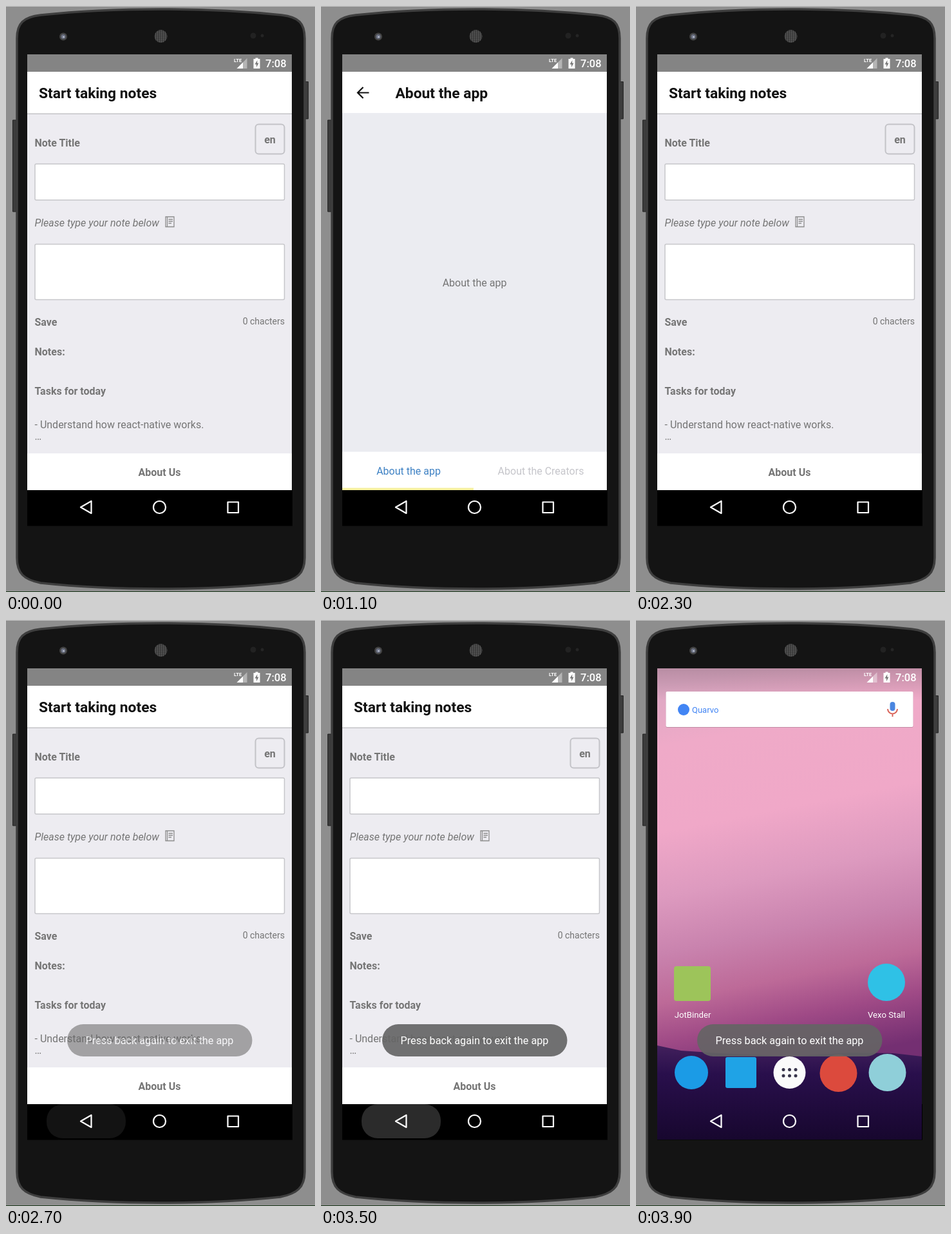
An HTML page that plays this animation: 480x909 px, repeating every 4000 ms.

```html
<!DOCTYPE html>
<html lang="en">
<head>
<meta charset="utf-8">
<title>Note app on a phone</title>
<style>
  html, body { margin: 0; width: 480px; height: 909px; overflow: hidden; background: #8e8e8e; }
  svg { display: block; }
  text { font: 16px Roboto, sans-serif; fill: #757575; }
  .b { font-weight: 700; }
  .i { font-style: italic; }
  .c { text-anchor: middle; }
  .title { font-size: 22.8px; font-weight: 700; fill: #111; }
  .label { font-size: 13.2px; fill: #fff; text-anchor: middle; }
  .field { fill: #fff; stroke: #c6c6ca; stroke-width: 1.5; }
</style>
</head>
<body>
<svg width="480" height="909" viewBox="0 0 480 909">
  <defs>
    <clipPath id="screen"><path d="M33 75H444V806H33z"/></clipPath>
    <linearGradient id="sky" gradientUnits="userSpaceOnUse" x1="180" y1="75" x2="300" y2="680">
      <stop offset="0" stop-color="#dca8c3"/>
      <stop offset=".15" stop-color="#efaac8"/>
      <stop offset=".36" stop-color="#f0a8c8"/>
      <stop offset=".52" stop-color="#dd9abf"/>
      <stop offset=".66" stop-color="#c983ae"/>
      <stop offset=".78" stop-color="#bd6a98"/>
      <stop offset=".88" stop-color="#9f4a86"/>
      <stop offset="1" stop-color="#742f72"/>
    </linearGradient>
    <linearGradient id="hills" x2="0" y2="1">
      <stop offset="0" stop-color="#42205c"/>
      <stop offset=".3" stop-color="#290f4c"/>
      <stop offset="1" stop-color="#17072e"/>
    </linearGradient>
    <linearGradient id="scrim" x2="0" y2="1">
      <stop offset="0" stop-opacity=".16"/>
      <stop offset="1" stop-opacity="0"/>
    </linearGradient>
    <pattern id="mesh" width="3" height="3" patternUnits="userSpaceOnUse">
      <path fill="#333" d="M0 0H3V3H0z"/>
      <circle cx="1.5" cy="1.5" r="1" fill="#686868"/>
    </pattern>
  </defs>

  <!-- Phone body -->
  <path fill="#c4c4c4" d="M0 0H480V1H0z"/>
  <path fill="#1d3a1d" d="M0 908H480V909H0z"/>
  <path fill="#3c3c3c" stroke="#222" d="M10.500 177H16V319H10.500zM464 117.500H469.500V175H464z"/>
  <path fill="#141414" stroke="#3e3e3e" stroke-width="3.500"
    d="M17 50C17 27 27 17 54 14Q140 5 240 5T428 14C455 17 464 27 464 50V856C464 880 452 890 426 895Q340 904 240 904T54 895C28 890 17 880 17 856z"/>
  <circle cx="89" cy="47.500" r="6" fill="#444"/>
  <circle cx="89" cy="47.500" r="3.500" fill="#6c7284"/>
  <circle cx="89.500" cy="48" r="1.300" fill="#c4c8d6"/>
  <circle cx="240.500" cy="47" r="10" fill="url(#mesh)"/>
  <circle cx="384" cy="46" r="4.500" fill="#222"/>
  <circle cx="398" cy="46" r="2.500" fill="#252525"/>
  <path d="M33 751H445V806.500H33z"/>

  <g clip-path="url(#screen)">
    <!-- Home screen -->
    <path fill="url(#sky)" d="M33 75H445V807H33z"/>
    <path fill="url(#hills)" d="M33 660L70 668 130 672 240 677 330 671 400 672 445 677V807H33z"/>
    <path fill="url(#scrim)" d="M33 75H445V125H33z"/>
    <rect x="46.500" y="112" width="384" height="55" rx="2" opacity=".18"/>
    <rect x="46.500" y="111" width="384" height="55" rx="2" fill="#fff"/>
    <circle cx="74" cy="139" r="9" fill="#4285f4"/>
    <text x="87" y="144" style="font-size:13px;fill:#4285f4">Quarvo</text>
    <rect x="394.500" y="127" width="8" height="14" rx="4" fill="#4a86e0"/>
    <path d="M391 138a7.500 7.500 0 0 0 15 0M398.500 146V150" fill="none" stroke="#d9645a" stroke-width="2"/>
    <rect x="59" y="537" width="57" height="54" rx="4" fill="#9dc45a"/>
    <circle cx="389" cy="562" r="29" fill="#2fc1e6"/>
    <text class="label" x="88" y="617">JotBinder</text>
    <text class="label" x="389" y="617">Vexo Stall</text>
    <circle cx="86" cy="702" r="26" fill="#1b9be6"/>
    <rect x="139" y="678" width="48" height="48" rx="3" fill="#1fa3e6"/>
    <circle cx="238.500" cy="702" r="25" fill="#fafafa"/>
    <path d="M229 697.500h.01m9.500 0h.01m9.500 0h.01M229 707h.01m9.500 0h.01m9.500 0h.01" stroke="#37344a" stroke-width="5" stroke-linecap="round"/>
    <circle cx="314.500" cy="703" r="29" fill="#dc4a3d"/>
    <circle cx="390.500" cy="702" r="29" fill="#8fcfd9"/>

    <g id="app">
      <!-- Note editor -->
      <path fill="#edecf1" d="M33 102H445V752H33z"/>
      <path fill="#fff" d="M33 102H445V167H33zM33 694H445V752H33z"/>
      <path fill="#c3c3c6" d="M33 166.500H445V168H33z"/>
      <text class="title" x="51" y="143.300">Start taking notes</text>
      <text class="b" x="44.500" y="217.500">Note Title</text>
      <rect x="387.500" y="183.500" width="45" height="46" rx="5" fill="none" stroke="#c3c3c8" stroke-width="2"/>
      <text class="b c" x="410" y="213">en</text>
      <rect class="field" x="45" y="245" width="387.500" height="56" rx="2"/>
      <text class="i" x="44.500" y="342">Please type your note below</text>
      <path d="M248 327H261V342.500H248zM250.500 327V342.500M252.500 331H259M252.500 334H259M252.500 337H257" fill="none" stroke="#8d8d8d" stroke-width="1.300"/>
      <rect class="field" x="45" y="369.500" width="387.500" height="86" rx="2"/>
      <text class="b" x="44.500" y="496">Save</text>
      <text x="433" y="493.500" text-anchor="end" style="font-size:14px">0 chacters</text>
      <text class="b" x="44.500" y="541.500">Notes:</text>
      <text class="b" x="44.500" y="603">Tasks for today</text>
      <text x="44.500" y="655">- Understand how react-native works.</text>
      <text x="44.500" y="673">…</text>
      <text class="b c" x="238.500" y="728.500">About Us</text>

      <!-- About card -->
      <g id="about">
        <path fill="#ebecf1" d="M33 102H445V752H33z"/>
        <path fill="#fff" d="M33 102H445V166H33zM33 691.500H445V752H33z"/>
        <path id="back" d="M74.500 134.500H57.500M65.500 126L57 134.500 65.500 143" fill="none" stroke="#111" stroke-width="2.200"/>
        <text class="title" x="115.500" y="143.300">About the app</text>
        <text class="c" x="238.500" y="435">About the app</text>
        <text class="c" x="136" y="727" style="fill:#3f82c4">About the app</text>
        <text class="c" x="341.500" y="727" style="fill:#c6c6cb">About the Creators</text>
        <path fill="#f6f1a0" d="M33 747.500H237V751H33z"/>
      </g>
      <path fill="#848484" d="M33 75H445V102H33z"/>
    </g>

    <path id="navbar" d="M33 751H445V807H33z"/>
    <rect id="ripple" x="63" y="751" width="123" height="53" rx="25" fill="#fff"/>
    <g fill="none" stroke="#fff" stroke-width="2.200" stroke-linejoin="round">
      <path d="M116 777.500L132.500 768V787zM344.500 769.500H361V786H344.500z"/>
      <circle cx="238.500" cy="777.500" r="9.500"/>
    </g>

    <!-- Status icons -->
    <text x="354" y="87" style="font-size:7.500px;font-weight:700;fill:#fff">LTE</text>
    <path fill="#fff" opacity=".4" d="M374.500 81V97H358.500z"/>
    <path fill="#fff" d="M368 87.500V97H358.500z"/>
    <path fill="#fff" d="M387.500 80.500H391.500V82H394.500V97H384.500V82H387.500z"/>
    <path fill="#777" d="M390.500 84L386.500 90.500H389V95L392.500 88.500H390z"/>
    <text x="403" y="95" style="font-size:16.500px;font-weight:500;fill:#fff">7:08</text>

    <g id="toast">
      <rect x="95" y="627" width="287.500" height="50" rx="25" fill="#646464" opacity=".91"/>
      <text class="c" x="238.500" y="658" style="font-size:16.250px;fill:#fff">Press back again to exit the app</text>
    </g>
  </g>
</svg>
<script>
  const LOOP = 4000, STEP = 100;
  const [app, about, back, navbar, ripple, toast] =
    ["app", "about", "back", "navbar", "ripple", "toast"].map(id => document.getElementById(id));

  const ramp = (t, from, to) => Math.min(1, Math.max(0, (t - from) / (to - from)));
  const easeOut = x => 1 - (1 - x) ** 5;
  const pulse = (t, start, peak, end) => ramp(t, start, peak) - ramp(t, peak, end);

  function place(el, opacity, dy) {
    el.setAttribute("opacity", opacity);
    el.setAttribute("transform", `translate(0 ${dy})`);
  }

  function draw() {
    const t = Math.floor(performance.now() % LOOP / STEP) * STEP;

    const card = easeOut(ramp(t, 478, 978)) - easeOut(ramp(t, 1780, 2280));
    place(about, card, 57 * (1 - card));
    back.setAttribute("opacity", ramp(card, 0.3, 1));

    const exit = ramp(t, 3580, 3800);
    place(app, 1 - exit, 60 * exit ** 2);
    navbar.setAttribute("opacity", 1 - exit);

    const press = pulse(t, 1700, 1800, 2000) + pulse(t, 2500, 2600, 2780) + pulse(t, 3400, 3500, 3700);
    ripple.setAttribute("opacity", 0.17 * press);
    toast.setAttribute("opacity", ramp(t, 2580, 2780));
    requestAnimationFrame(draw);
  }
  draw();
</script>
</body>
</html>
```
